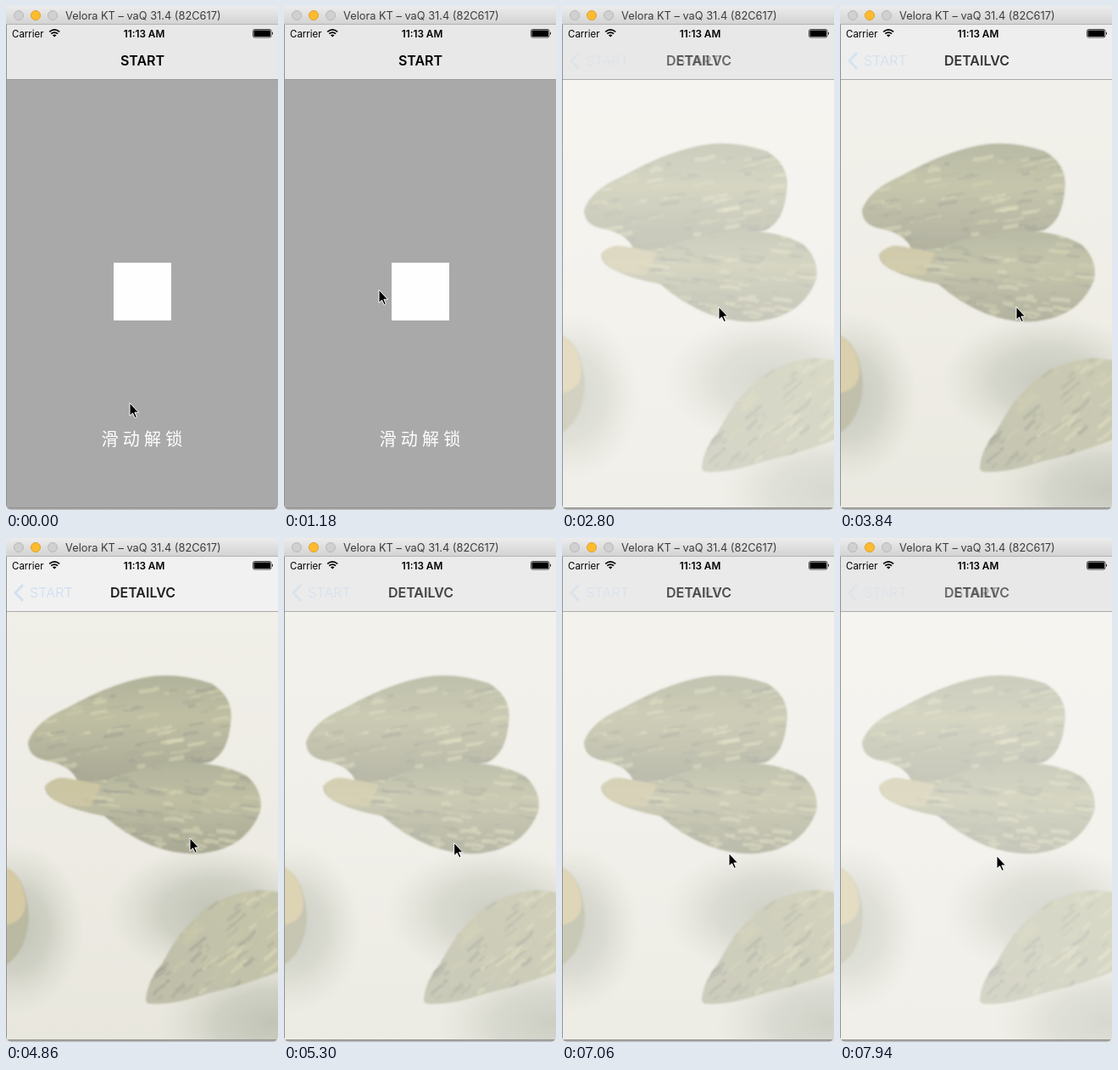
Recreate the animation shown at these times as an HTML page. Size 321x593 px, loop 8 s.

```html
<!DOCTYPE html>
<html lang="en">
<head>
<meta charset="utf-8">
<title>Slide to unlock</title>
<style>
  html, body { margin: 0; width: 100%; height: 100%; overflow: hidden; background: #fff; }
  svg { display: block; width: 321px; height: 593px; }
  text { font-family: Inter, "Liberation Sans", sans-serif; }
  .title { font-size: 16px; font-weight: 600; text-anchor: middle; }
  .slide { font: 300 20px "Noto Sans CJK SC", "Noto Sans CJK", sans-serif; letter-spacing: .4px; fill: #fff; }
</style>
</head>
<body>
<svg viewBox="0 0 321 593">
  <defs>
    <linearGradient id="chrome" x2="0" y2="1">
      <stop stop-color="#ececec"/><stop offset="1" stop-color="#d2d2d2"/>
    </linearGradient>
    <linearGradient id="edge" x2="0" y2="1">
      <stop stop-color="#848484"/><stop offset="1" stop-color="#c9c9c9"/>
    </linearGradient>
    <linearGradient id="paper" x2="0" y2="1">
      <stop stop-color="#e2e0d2"/><stop offset=".5" stop-color="#dcd8c8"/><stop offset="1" stop-color="#d0cdb8"/>
    </linearGradient>
    <radialGradient id="shade">
      <stop stop-color="#7c8064"/><stop offset=".5" stop-color="#8d9076" stop-opacity=".8"/>
      <stop offset="1" stop-color="#a8aa90" stop-opacity="0"/>
    </radialGradient>
    <linearGradient id="husk" x2="0" y2="1">
      <stop stop-color="#585c28"/><stop offset=".4" stop-color="#77763a"/><stop offset="1" stop-color="#45451c"/>
    </linearGradient>
    <linearGradient id="pale" x1="1" x2="0" y2="1">
      <stop stop-color="#83834a"/><stop offset="1" stop-color="#757448"/>
    </linearGradient>
    <filter id="soft"><feGaussianBlur stdDeviation="1.2"/></filter>
    <clipPath id="screen"><rect x="1" y="22" width="320" height="568"/></clipPath>
    <clipPath id="window"><rect id="reveal"/></clipPath>
    <clipPath id="back"><path id="backSeed" d="M26 240Q34 216 72 200Q122 172 164 164Q200 157 242 171Q270 188 265 218Q262 254 240 264Q190 270 150 281Q110 292 84 286Q78 268 48 262Q26 258 26 240Z"/></clipPath>
    <clipPath id="mid"><path id="midSeed" d="M46 292Q58 278 78 284Q100 289 120 284Q160 268 205 264Q256 264 284 280Q304 297 300 322Q286 358 248 368Q212 377 172 362Q142 350 116 327Q84 322 60 310Q46 303 46 292Z"/></clipPath>
    <clipPath id="front"><path id="frontSeed" d="M165 543Q167 520 185 500Q205 458 242 431Q285 408 323 417V510Q282 526 238 536Q196 550 171 548Q165 548 165 543Z"/></clipPath>
  </defs>

  <g clip-path="url(#screen)">
    <rect width="321" height="593" fill="#a9a9a9"/>
    <text class="slide" x="112.5" y="517">滑 动 解 锁</text>
    <rect id="square" fill="#fefefe"/>
    <g id="photo" clip-path="url(#window)">
      <rect y="22" width="321" height="568" fill="url(#paper)"/>
      <ellipse cx="245" cy="440" rx="125" ry="78" fill="url(#shade)"/>
      <ellipse cx="10" cy="460" rx="82" ry="100" fill="url(#shade)"/>
      <ellipse cx="315" cy="570" rx="135" ry="75" fill="url(#shade)"/>
      <g filter="url(#soft)">
        <use href="#backSeed" fill="url(#husk)"/>
        <g id="backGrain" clip-path="url(#back)"/>
        <use href="#midSeed" fill="url(#husk)"/>
        <g id="midGrain" clip-path="url(#mid)"/>
        <path d="M46 292Q58 278 80 284L112 290L100 316Q70 316 54 306Z" fill="#a28d3c" opacity=".7"/>
        <use href="#frontSeed" fill="url(#pale)"/>
        <g id="frontGrain" clip-path="url(#front)"/>
        <path d="M-3 386Q24 396 27 446Q24 490 -3 504Z" fill="#6c6a38"/>
        <path d="M-3 386Q20 396 23 430Q22 452 -3 456Z" fill="#a78f3a"/>
      </g>
    </g>

    <rect id="bar" x="1" y="22" width="320" height="64"/>
    <rect x="1" y="86" width="320" height="1" fill="#999" opacity=".8"/>
    <text id="start" class="title" x="161" y="70">START</text>
    <text id="detail" class="title" x="161.5" y="70">DETAILVC</text>
    <g id="goBack">
      <path d="M20 55L11 64.500L20 74" fill="none" stroke="#007aff" stroke-width="3"/>
      <text x="28" y="70" font-size="16" fill="#007aff">START</text>
    </g>

    <text x="7" y="36.500" font-size="11.500">Carrier</text>
    <g fill="none" stroke="#000" stroke-width="1.700">
      <path d="M51.200 30.300Q57.200 25.300 63.200 30.300M53.300 32.700Q57.200 29.400 61.100 32.700"/>
      <path d="M57.200 36.600L54.900 34.300Q57.200 32.500 59.500 34.300Z" fill="#000" stroke="none"/>
    </g>
    <text x="163" y="36.500" font-size="11.800" font-weight="600" text-anchor="middle">11:13 AM</text>
    <rect x="291.500" y="27.500" width="21.500" height="9.500" rx="2" fill="none" stroke="#000" stroke-width=".7"/>
    <rect x="292.500" y="28.500" width="19.500" height="7.500" rx="1"/>
    <path d="M314 30.500Q316 32.200 314 34Z"/>
  </g>

  <rect width="321" height="22" fill="url(#chrome)"/>
  <rect y="21" width="321" height="1" fill="#b4b4b4"/>
  <g stroke-width="1">
    <circle cx="15" cy="11" r="5.500" fill="#d0d0d0" stroke="#b8b8b8"/>
    <circle cx="35" cy="11" r="5.500" fill="#fdbc2e" stroke="#e0a030"/>
    <circle cx="55" cy="11" r="5.500" fill="#d0d0d0" stroke="#b8b8b8"/>
  </g>
  <text x="70" y="16" font-size="12.800" fill="#3c3c3c">Velora KT – vaQ 31.4 (82C617)</text>
  <rect y="22" width="1" height="568" fill="#929292"/>
  <rect y="590" width="321" height="3" fill="url(#edge)"/>
  <path d="M0 587Q1 592 6 593H0ZM321 587Q320 592 315 593H321Z" fill="#e4e4e4"/>

  <path id="cursor" d="M0 0V15.200L3.500 12L6.200 17.600L8.400 16.500L5.900 11.200H10.600Z" stroke="#fff" stroke-width="1"/>
</svg>

<script>
const LOOP = 8000, STEP = 147;
const $ = id => document.getElementById(id);
const clamp = v => Math.max(0, Math.min(1, v));

// Pointer path: step, x, y
const path = [
  [0, 146, 467], [2, 165, 436], [4, 186, 392], [6, 150, 348], [8, 112, 334],
  [9, 124, 338], [14, 150, 351], [16, 159, 352], [19, 185, 354], [21, 203, 354],
  [22, 203, 354], [26, 208, 354], [28, 212, 354], [29, 212, 354], [33, 217, 353],
  [35, 211, 356], [38, 180, 364], [41, 145, 370], [42, 143, 370], [44, 158, 370],
  [48, 197, 371], [50, 203, 372], [52, 197, 373], [54, 185, 374]
];

function pointer(step) {
  let i = 1;
  while (i < path.length - 1 && path[i][0] < step) i++;
  const [a, ax, ay] = path[i - 1], [b, bx, by] = path[i];
  const f = clamp((step - a) / (b - a));
  return [ax + (bx - ax) * f, ay + (by - ay) * f];
}

// Ease-in curve, cubic-bezier(.42, 0, 1, 1)
function easeIn(t) {
  let lo = 0, hi = 1;
  for (let i = 0; i < 24; i++) {
    const u = (lo + hi) / 2;
    if (1.26 * u + .48 * u * u - .74 * u ** 3 < t) lo = u; else hi = u;
  }
  return 3 * lo * lo - 2 * lo ** 3;
}

function setBox(el, x, y, size) {
  const box = { x, y, width: size, height: size };
  for (const key in box) el.setAttribute(key, box[key]);
}

function grain(id, x, y, w, h, angle, seed) {
  const rnd = () => (seed = seed * 16807 % 2147483647) / 2147483647;
  const tones = ["#2a2e12", "#b5b168", "#4a4a22", "#96924a"];
  let out = "";
  for (let i = 0; i < 120; i++) {
    const px = x + rnd() * w, py = y + rnd() * h, len = 5 + rnd() * 24;
    out += `<path d="M0 0q${len / 2} ${rnd() * 8 - 4} ${len} 0" transform="translate(${px} ${py}) rotate(${angle})"
      fill="none" stroke="${tones[i % 4]}" stroke-width="${1.5 + rnd() * 3.5}" opacity=".5"/>`;
  }
  $(id).innerHTML = out;
}
grain("backGrain", 30, 165, 225, 120, -10, 17);
grain("midGrain", 90, 268, 195, 100, 6, 41);
grain("frontGrain", 165, 415, 145, 130, -40, 73);

function draw(now) {
  const step = Math.floor(now % LOOP / STEP);
  const [x, y] = pointer(step);
  const t = step < 9 ? 0 : clamp((x - 125.2) / 200);

  const grow = 149 * easeIn(t);
  const size = 68 * (1 + grow);
  const left = 161 - size / 2;
  const top = 336 - grow * 1500 / 149 - size / 2;
  setBox($("square"), left, top, size);
  setBox($("reveal"), left, top - 30, size);

  const level = Math.round(232 + Math.max(0, t - .33) * 70);
  $("bar").setAttribute("fill", `rgb(${level},${level},${level})`);
  $("photo").setAttribute("opacity", t);
  $("start").setAttribute("opacity", clamp(1 - 2.5 * t));
  $("detail").setAttribute("opacity", clamp(2 * t - .05));
  $("goBack").setAttribute("opacity", 1.3 * t ** 3);
  $("cursor").setAttribute("transform", `translate(${x} ${y})`);
}

const begin = performance.now();
function tick() {
  draw(performance.now() - begin);
  requestAnimationFrame(tick);
}
tick();
</script>
</body>
</html>
```
